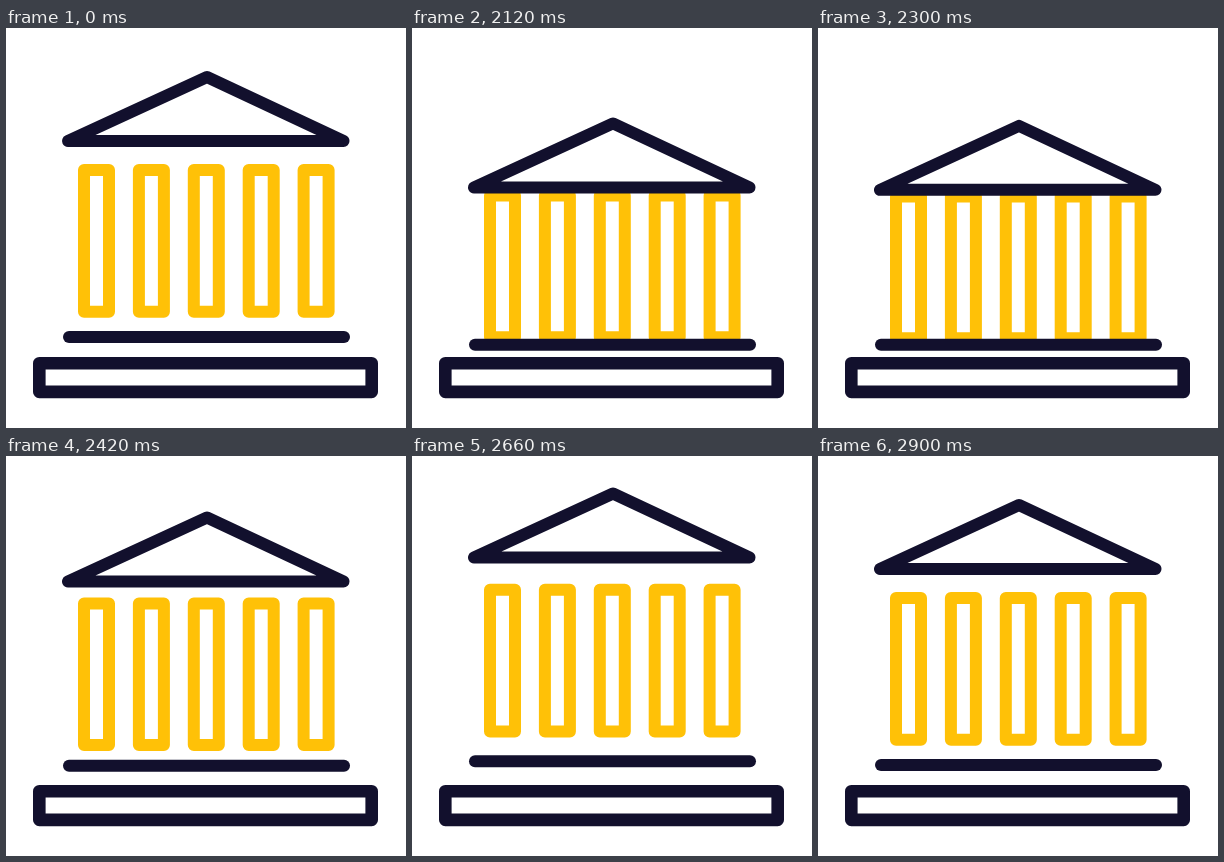
Animation of 400 by 400 pixels, one loop 2930 ms. Source, as an HTML page:

```html
<!DOCTYPE html>
<html lang="en">
<head>
<meta charset="utf-8">
<title>Bank icon</title>
<style>
  html, body { margin: 0; height: 100%; overflow: hidden; background: #fff; }
  svg { display: block; width: 100vw; height: 100vh; fill: none; stroke: #12102d;
        stroke-width: 12; stroke-linejoin: round; stroke-linecap: round; }
  #columns { stroke: #ffc107; }
</style>
</head>
<body>
<svg viewBox="0 0 400 400">
  <path id="columns"/>
  <path id="roof" d="M62 113H337.5L201 49Z"/>
  <path id="step" d="M63 309H338"/>
  <rect x="33.3" y="335.3" width="332.4" height="28.6" stroke-width="12.6"/>
</svg>
<script>
const LOOP = 2930, START = 2030, TICK = 30;
const LOW = 2210, HIGH = 2565, REST = 2910;

// How far each part sinks, then rebounds, before it settles
const parts = [
  { id: 'roof', sink: 60, rise: -14 },
  { id: 'columns', sink: 33, rise: -10 },
  { id: 'step', sink: 10, rise: -4.5 },
].map(p => ({ ...p, el: document.getElementById(p.id) }));

document.getElementById('columns').setAttribute('d',
  [0, 1, 2, 3, 4].map(i => `M${78 + 54.9 * i} 142h25v141.7h-25z`).join(''));

const progress = (t, from, to) => Math.min(1, Math.max(0, (t - from) / (to - from)));
const easeOut = p => Math.sin(p * Math.PI / 2);
const easeInOut = p => (1 - Math.cos(p * Math.PI)) / 2;

function offset(t, { sink, rise }) {
  if (t < START) return 0;
  if (t < LOW) return sink * easeOut(progress(t, 2004, LOW));
  if (t < HIGH) return sink + (rise - sink) * easeInOut(progress(t, LOW, HIGH));
  return rise * (1 - easeInOut(progress(t, HIGH, REST)));
}

function draw(now) {
  const t = START + Math.floor((now % LOOP - START) / TICK) * TICK;
  for (const p of parts) p.el.setAttribute('transform', `translate(0 ${offset(t, p).toFixed(2)})`);
  requestAnimationFrame(() => draw(performance.now()));
}
draw(performance.now());
</script>
</body>
</html>
```
